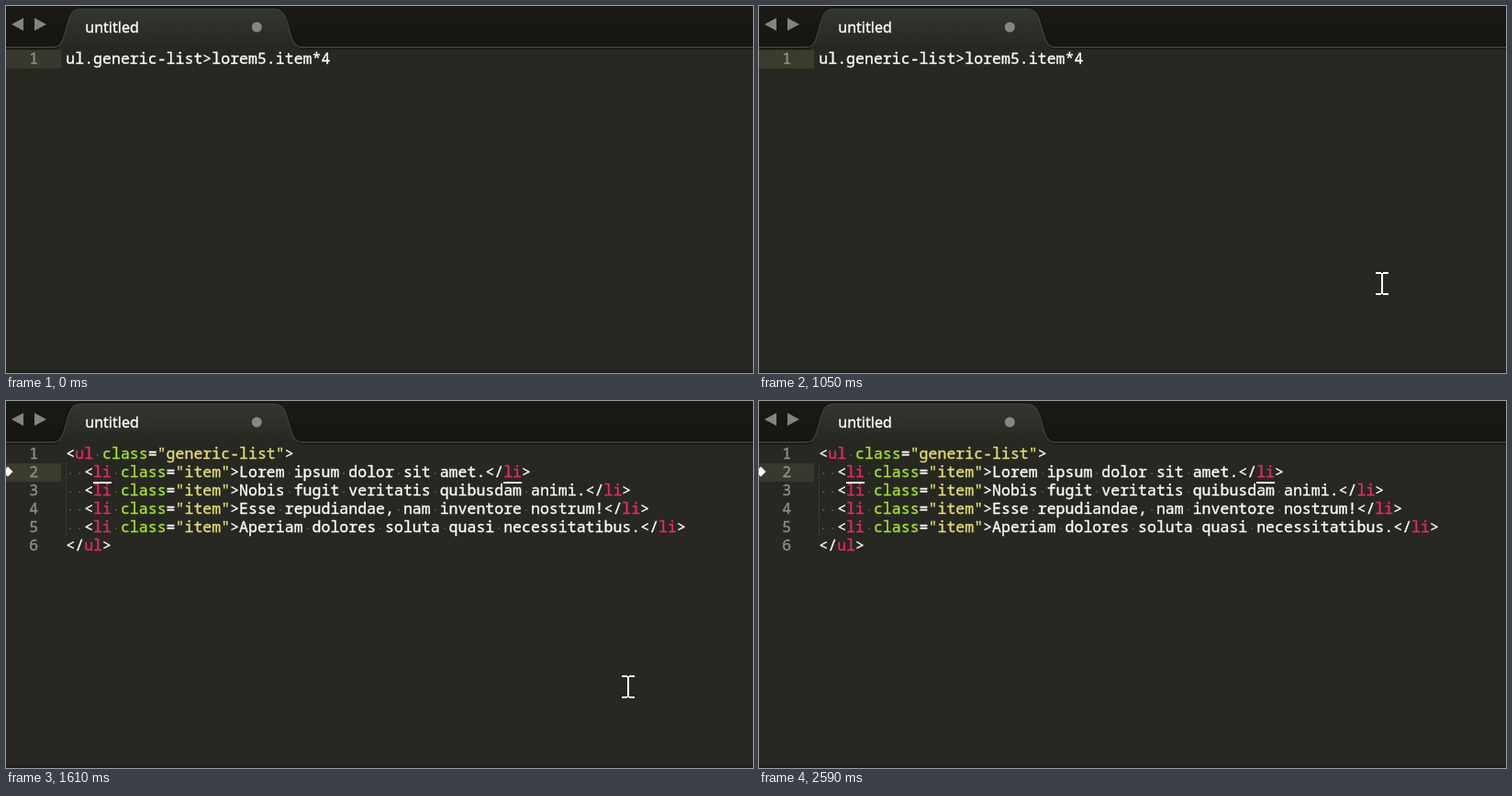
Recreate the animation shown at these times as an HTML page with a canvas. Size 814x400 px, loop 2660 ms.

```html
<!DOCTYPE html>
<html lang="en">
<head>
<meta charset="utf-8">
<title>Snippet expansion</title>
<style>
html, body { margin: 0; width: 100%; height: 100%; overflow: hidden; background: #272822; }
canvas { display: block; width: 814px; height: 400px; }
</style>
</head>
<body>
<canvas id="stage" width="814" height="400"></canvas>
<script>
const ctx = document.getElementById('stage').getContext('2d');
const W = 814, H = 400, LOOP = 2660, STEP = 70;
const LEFT = 65.3, TOP = 48, ROW = 20, CELL = 9.935;
const MONO = '16.55px "Noto Sans Mono", "DejaVu Sans Mono", monospace';
const SANS = '16px "Noto Sans", "Open Sans", sans-serif';
const WHITE = '#fcfcf8', PINK = '#e6286d', GREEN = '#a6e22e', YELLOW = '#e6db74';
const GREY = '#8f908a', DOT = '#4b4c45';

const item = text => [
  ['  <', WHITE], ['li', PINK], [' class', GREEN], ['=', WHITE], ['"item"', YELLOW],
  ['>' + text + '</', WHITE], ['li', PINK], ['>', WHITE]
];
const before = [[['ul.generic-list>lorem5.item*4', WHITE]]];
const after = [
  [['<', WHITE], ['ul', PINK], [' class', GREEN], ['=', WHITE], ['"generic-list"', YELLOW], ['>', WHITE]],
  item('Lorem ipsum dolor sit amet.'),
  item('Nobis fugit veritatis quibusdam animi.'),
  item('Esse repudiandae, nam inventore nostrum!'),
  item('Aperiam dolores soluta quasi necessitatibus.'),
  [['</', WHITE], ['ul', PINK], ['>', WHITE]]
];

function rect(x, y, w, h, color) {
  ctx.fillStyle = color;
  ctx.fillRect(x, y, w, h);
}

function poly(color, ...pts) {
  ctx.fillStyle = color;
  ctx.beginPath();
  pts.forEach(([x, y]) => ctx.lineTo(x, y));
  ctx.fill();
}

// A hairline stroke gives the sturdier strokes of screen-hinted type.
function write(text, x, y, color) {
  ctx.fillStyle = ctx.strokeStyle = color;
  ctx.lineWidth = 0.35;
  ctx.fillText(text, x, y);
  ctx.strokeText(text, x, y);
}

function fade(y0, y1, from, to) {
  const g = ctx.createLinearGradient(0, y0, 0, y1);
  g.addColorStop(0, from);
  g.addColorStop(1, to);
  return g;
}

function tabPath() {
  ctx.beginPath();
  ctx.moveTo(-3, 45);
  ctx.lineTo(52, 45);
  ctx.bezierCurveTo(69, 45, 62, 3.5, 80, 3.5);
  ctx.lineTo(293, 3.5);
  ctx.bezierCurveTo(312, 3.5, 305, 45, 322, 45);
  ctx.lineTo(W + 3, 45);
}

function drawTabs() {
  rect(0, 0, W, 45, fade(0, 45, '#1a1b17', '#151612'));
  tabPath();
  ctx.strokeStyle = '#11120e';
  ctx.lineWidth = 4;
  ctx.stroke();
  ctx.fillStyle = fade(3, 45, '#353630', '#272822');
  ctx.fill();
  ctx.strokeStyle = '#393a34';
  ctx.lineWidth = 1.8;
  ctx.stroke();
  poly('#85837f', [6, 20], [19, 13], [19, 27]);
  poly('#85837f', [44, 20], [31, 13], [31, 27]);
  ctx.fillStyle = '#8b847f';
  ctx.beginPath();
  ctx.arc(273.3, 23, 5.5, 0, Math.PI * 2);
  ctx.fill();
  ctx.font = SANS;
  write('untitled', 86.3, 29, WHITE);
}

function drawLine(parts, row) {
  const base = TOP + row * ROW + 15;
  let col = 0;
  ctx.font = MONO;
  write(row + 1, 25.2, base, GREY);
  for (const [text, color] of parts) {
    for (const ch of text) {
      const x = LEFT + col++ * CELL;
      if (ch === ' ') rect(Math.round(x + 4), base - 5, 2, 2, DOT);
      else write(ch, x, base, color);
    }
  }
}

function drawCaret(x, row, alpha) {
  ctx.globalAlpha = alpha;
  rect(x, TOP + row * ROW, 1, ROW, '#f8f8f0');
  ctx.globalAlpha = 1;
}

function drawPointer([x, y]) {
  for (const dy of [-12, 11]) {
    rect(x - 7, y + dy, 6, 2, '#fff');
    rect(x + 1, y + dy, 6, 2, '#fff');
  }
  rect(x - 1, y - 11, 2, 23, '#fff');
}

function drawMatch() {
  rect(95, 88, 20, 2, '#fff');
  rect(542, 88, 20, 2, '#fff');
  poly('#fff', [2, 71.5], [7.5, 77], [2, 82.5], [-3.5, 77]);
}

// Pointer glides in with a decelerating path, rests, then drops away.
function pointerAt(t) {
  if (t < 70 || t >= 1750) return null;
  if (t < 280) {
    const left = Math.pow(1 - (t - 70) / 210, 2);
    return [Math.round(679 + 6 * left), Math.round(302 + 57 * left)];
  }
  if (t < 1540) return [679, 302];
  if (t < 1610) return [679, 304];
  return t < 1680 ? [678, 311] : [691, 368];
}

function caretAt(t) {
  if (t < 560) return 0;
  if (t < 1120) return t < 770 ? 1 : t < 910 ? 0.5 : 0;
  if (t < 1470) return 1;
  if (t < 1610) return t < 1540 ? 0.65 : 0.3;
  if (t < 1960) return 0;
  if (t < 2170) return (t - 1960 + STEP) / 280;
  if (t < 2450) return 1;
  return t < 2520 ? 0.65 : t < 2590 ? 0.3 : 0;
}

function draw(t) {
  const open = t >= 1120;
  const active = open ? 1 : 0;
  rect(0, 0, W, H, '#272822');
  drawTabs();
  rect(0, H - 3, W, 3, fade(H - 3, H, '#252620', '#1b1c18'));
  rect(0, TOP + active * ROW, 60, ROW, t >= 1050 && t < 2590 ? '#3c3c2e' : '#38382e');
  if (open) for (let y = 68; y < 148; y += 2) rect(65, y, 1, 1, DOT);
  (open ? after : before).forEach(drawLine);
  if (t >= 1330) drawMatch();
  drawCaret(open ? 253 : 352, active, caretAt(t));
  const p = pointerAt(t);
  if (p) drawPointer(p);
}

const start = performance.now();
function tick() {
  const t = (performance.now() - start) % LOOP;
  draw(Math.floor(t / STEP) * STEP);
  requestAnimationFrame(tick);
}
tick();
</script>
</body>
</html>
```
